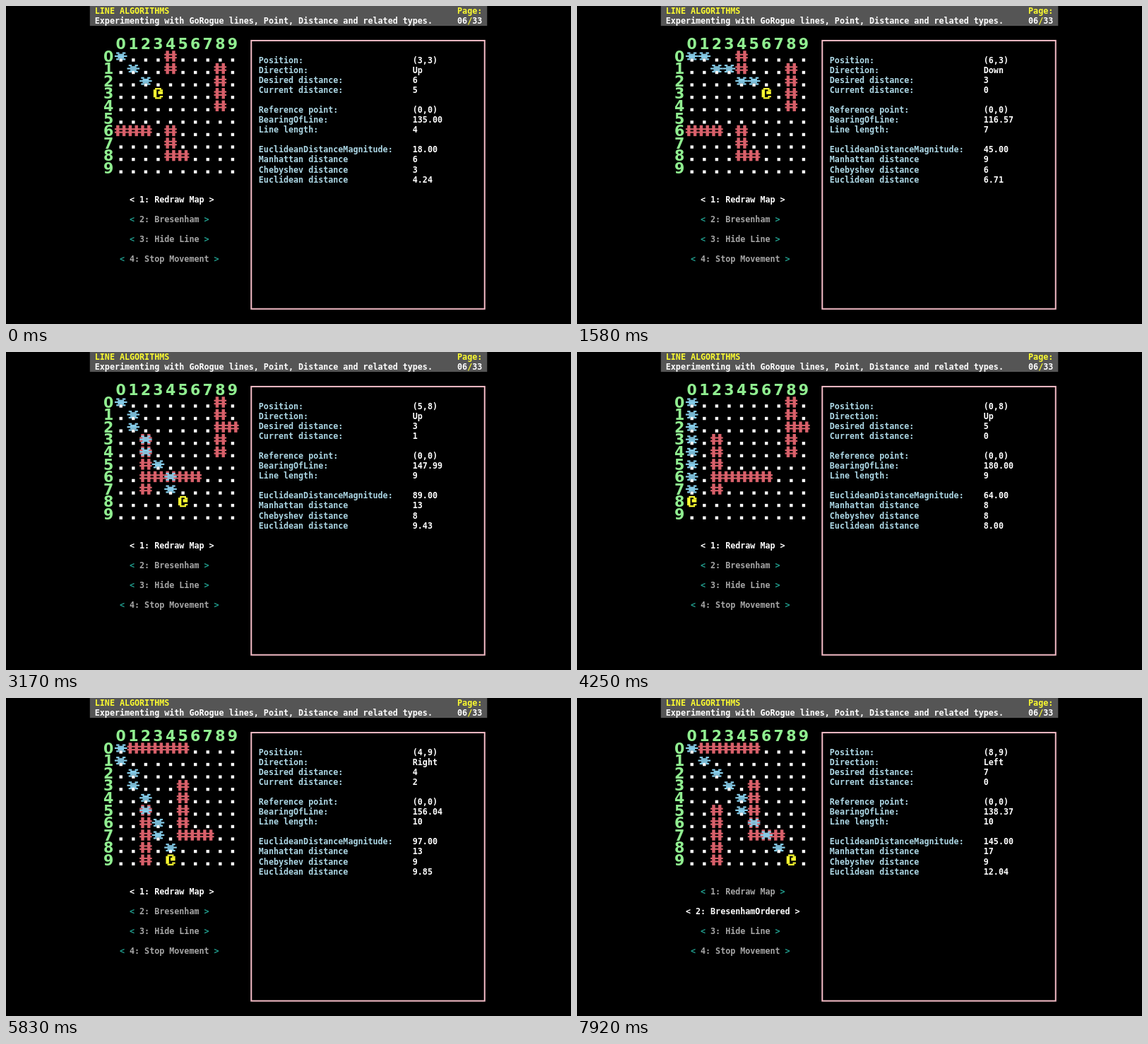
An HTML page with a canvas that plays this animation: 800x450 px, repeating every 8 s.

```html
<!DOCTYPE html>
<html>
<head>
<meta charset="utf-8">
<style>
  html, body { margin: 0; width: 100%; height: 100%; overflow: hidden; background: #000; }
  canvas { display: block; }
</style>
</head>
<body>
<canvas id="stage" width="800" height="450"></canvas>
<script>
const ctx = document.getElementById('stage').getContext('2d');

// Terminal grid: 80 x 32 character cells; the map uses larger square cells.
const CELL_W = 562.5 / 80, CELL_H = 450 / 32, LEFT = 118.75;
const TILE = CELL_W * 2.5, MAP_X = LEFT + 2 * TILE, MAP_Y = CELL_H * 4.5;
const SIZE = 10, TICKS = 96, LOOP = 8000;
const TEXT_FONT = 'bold 11.68px "DejaVu Sans Mono", monospace';
const AXIS_FONT = 'bold 20.5px "DejaVu Sans", sans-serif';
const WHITE = '#fff', YELLOW = '#fcfc30', GRAY = '#a6a6a6', TEAL = '#219c8c',
      BLUE = '#add8e6', GREEN = '#90ee90', RED = '#d8606a', SKY = '#87ceeb', PINK = '#f4bcc6';

// Tile glyphs as rectangles [x, y, w, h] in an 8 x 8 cell.
const GLYPHS = {
  '.': [[3, 5, 2, 2]],
  '#': [[1, 0, 2, 7], [5, 0, 2, 7], [0, 2, 8, 1], [0, 4, 8, 1]],
  '*': [[1, 1, 2, 1], [5, 1, 2, 1], [2, 2, 4, 1], [0, 3, 8, 1], [2, 4, 4, 1], [1, 5, 2, 1], [5, 5, 2, 1]],
  '@': [[2, 0, 4, 1], [1, 1, 2, 5], [5, 1, 2, 1], [4, 2, 3, 2], [5, 5, 2, 1], [2, 6, 4, 1]]
};

// Wall blocks [x, y, w, h] and the tick each map appears at.
const MAPS = [
  { from: 0, walls: [[4, 0, 1, 2], [8, 1, 1, 4], [0, 6, 3, 1], [4, 6, 1, 3], [5, 8, 1, 1]] },
  { from: 36, walls: [[8, 0, 1, 5], [9, 2, 1, 1], [2, 3, 1, 5], [3, 6, 4, 1]] },
  { from: 66, walls: [[1, 0, 5, 1], [5, 3, 1, 5], [6, 7, 2, 1], [2, 5, 1, 5]] }
];
const PAUSE_TICK = 35, SWITCH_TICK = 90, FIRST_STEP = 5;

const DIRS = { Up: [0, -1], Down: [0, 1], Left: [-1, 0], Right: [1, 0] };
// Each leg: direction, desired distance, and moves made if cut short.
const LEGS = [
  ['Up', 6], ['Right', 2], ['Down', 1], ['Left', 1], ['Right', 7, 5],
  ['Left', 3], ['Down', 3], ['Right', 6, 3], ['Down', 7, 3],
  ['Left', 4], ['Up', 3], ['Left', 3], ['Down', 2], ['Left', 6, 2], ['Up', 5],
  ['Down', 2], ['Right', 2], ['Down', 7, 4], ['Right', 4],
  ['Up', 1], ['Right', 1], ['Down', 1], ['Up', 1], ['Right', 8, 2],
  ['Left', 4], ['Down', 4, 1], ['Right', 3], ['Left', 7, 0]
];

// A turn takes one step in place, then one step per move.
function walk(x, y) {
  const steps = [];
  for (const [dir, desired, moves = desired] of LEGS) {
    for (let current = 0; current <= moves; current++) {
      if (current) { x += DIRS[dir][0]; y += DIRS[dir][1]; }
      steps.push({ x, y, dir, desired, current });
    }
  }
  return steps;
}
const STEPS = walk(3, 8);

function text(str, col, row, color) {
  ctx.font = TEXT_FONT;
  ctx.textAlign = 'left';
  ctx.fillStyle = color;
  [...str].forEach((ch, i) => ctx.fillText(ch, LEFT + (col + i) * CELL_W, row * CELL_H + 10.5));
}

function tile(ch, x, y, color) {
  const unit = TILE / 8;
  ctx.fillStyle = color;
  for (const [gx, gy, w, h] of GLYPHS[ch])
    ctx.fillRect(MAP_X + x * TILE + gx * unit, MAP_Y + y * TILE + gy * unit, w * unit, h * unit);
}

function axisDigit(n, x, y) {
  ctx.font = AXIS_FONT;
  ctx.textAlign = 'center';
  ctx.fillStyle = GREEN;
  ctx.fillText(n, MAP_X + (x + 0.5) * TILE, MAP_Y + (y + 0.875) * TILE);
}

function drawHeader() {
  ctx.fillStyle = '#555';
  ctx.fillRect(LEFT, 0, 80 * CELL_W, 2 * CELL_H);
  text('LINE ALGORITHMS', 1, 0, YELLOW);
  text('Experimenting with GoRogue lines, Point, Distance and related types.', 1, 1, WHITE);
  text('Page:', 74, 0, YELLOW);
  text('06', 74, 1, WHITE);
  text('/', 76, 1, YELLOW);
  text('33', 77, 1, WHITE);
}

function drawMap(tick, { x, y }) {
  const { walls } = MAPS.filter(m => m.from <= tick).pop();
  const isWall = (c, r) => walls.some(([wx, wy, w, h]) => c >= wx && c < wx + w && r >= wy && r < wy + h);
  for (let r = 0; r < SIZE; r++) {
    axisDigit(r, r, -1);
    axisDigit(r, -1, r);
    for (let c = 0; c < SIZE; c++) {
      if (c === x && r === y) continue;
      if (isWall(c, r)) tile('#', c, r, RED);
      else tile('.', c, r, WHITE);
    }
  }
  const length = Math.max(x, y);
  const along = (v, i) => Math.ceil(v * i / length - 0.5);
  for (let i = 0; i < length; i++) tile('*', along(x, i), along(y, i), SKY);
  tile('@', x, y, YELLOW);
}

function drawInfo({ x, y, dir, desired, current }) {
  ctx.strokeStyle = PINK;
  ctx.lineWidth = 2;
  ctx.strokeRect(LEFT + 32.5 * CELL_W, 3.48 * CELL_H, 47 * CELL_W, 27 * CELL_H);
  const square = x * x + y * y;
  const bearing = 90 + Math.atan2(y, x) * 180 / Math.PI;
  [
    [5, 'Position:', `(${x},${y})`],
    [6, 'Direction:', dir],
    [7, 'Desired distance:', desired],
    [8, 'Current distance:', current],
    [10, 'Reference point:', '(0,0)'],
    [11, 'BearingOfLine:', bearing.toFixed(2)],
    [12, 'Line length:', Math.max(x, y) + 1],
    [14, 'EuclideanDistanceMagnitude:', square.toFixed(2)],
    [15, 'Manhattan distance', x + y],
    [16, 'Chebyshev distance', Math.max(x, y)],
    [17, 'Euclidean distance', Math.sqrt(square).toFixed(2)]
  ].forEach(([row, label, value]) => {
    text(label, 34, row, BLUE);
    text(String(value), 65, row, WHITE);
  });
}

function drawButtons(tick) {
  const switched = tick >= SWITCH_TICK, focus = switched ? 1 : 0;
  ['Redraw Map', switched ? 'BresenhamOrdered' : 'Bresenham', 'Hide Line', 'Stop Movement'].forEach((name, i) => {
    const label = `${i + 1}: ${name}`, row = 19 + 2 * i;
    const col = Math.floor((33 - label.length - 4) / 2);
    const bracket = i === focus ? WHITE : TEAL;
    text('<', col, row, bracket);
    text(label, col + 2, row, i === focus ? WHITE : GRAY);
    text('>', col + label.length + 3, row, bracket);
  });
}

function render(now) {
  const tick = Math.floor((now % LOOP + 5) * TICKS / LOOP) % TICKS;
  const step = STEPS[tick + FIRST_STEP - (tick >= PAUSE_TICK ? 1 : 0)];
  ctx.fillStyle = '#000';
  ctx.fillRect(0, 0, 800, 450);
  drawHeader();
  drawMap(tick, step);
  drawInfo(step);
  drawButtons(tick);
}

let start;
function loop(now) {
  start ??= now;
  render(now - start);
  requestAnimationFrame(loop);
}
render(0);
requestAnimationFrame(loop);
</script>
</body>
</html>
```
